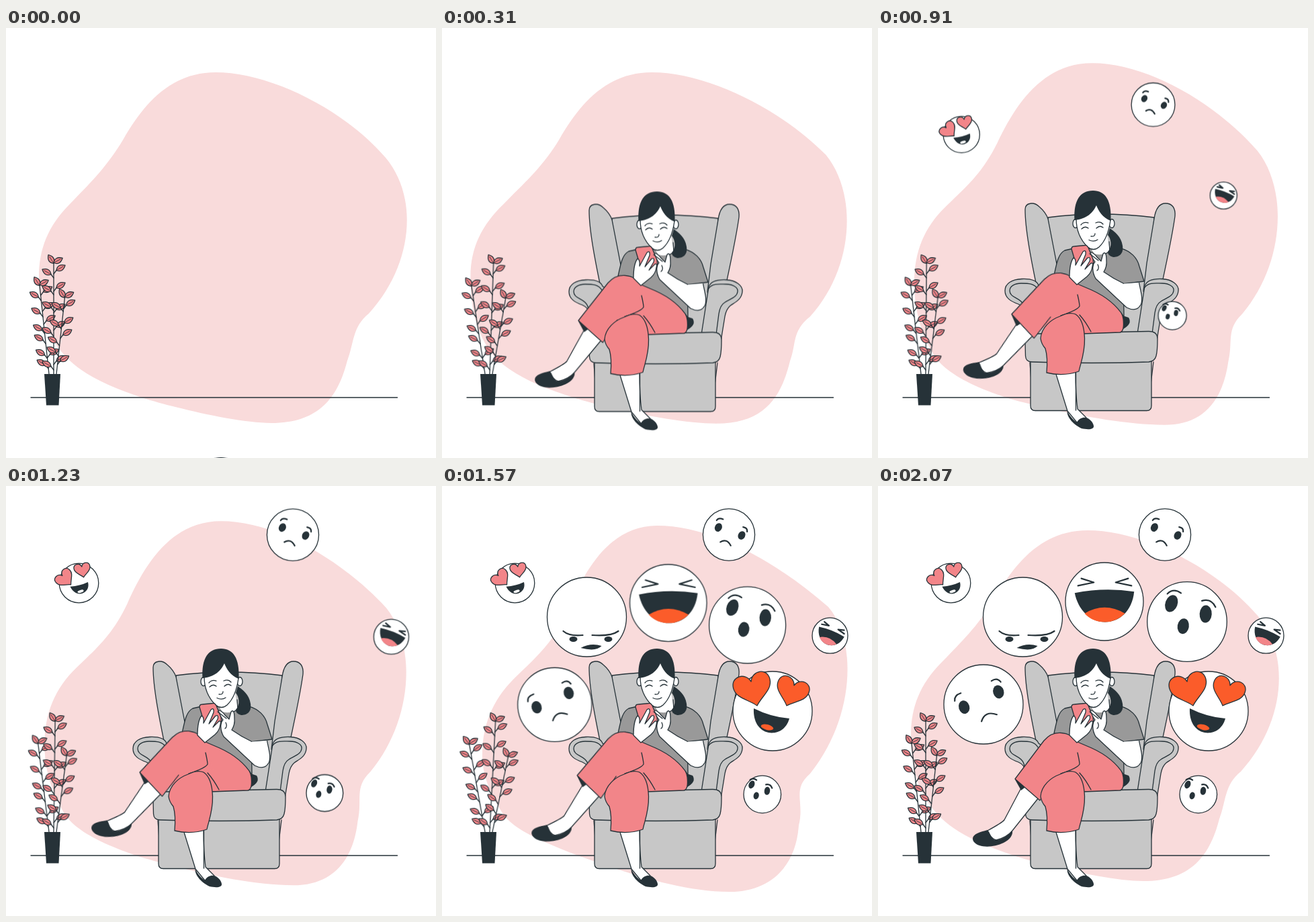
An HTML page for the animation above (2.1 s loop, 640x640 px).

```html
<!DOCTYPE html>
<html lang="en">
<head>
<meta charset="utf-8">
<title>Reactions</title>
<style>
  html, body { margin: 0; width: 100%; height: 100%; overflow: hidden; background: #fff; }
  svg { display: block; width: 100vw; height: 100vh; }
  .line { fill: none; stroke: #263238; stroke-width: 1.3; stroke-linecap: round; stroke-linejoin: round; }
  .white, .pink, .grey, .shirt { stroke: #263238; stroke-width: 1.3; stroke-linejoin: round; }
  .white { fill: #fff; }
  .pink { fill: #f28589; }
  .grey { fill: #c7c7c7; }
  .shirt { fill: #999; }
  .dark { fill: #263238; }
  .bare { stroke: none; }
  .bold { stroke-width: 2.2; }
  .vein { stroke-width: .8; }
  #emojis * { vector-effect: non-scaling-stroke; }
  #emojis > g { transform-origin: 318px 332px; }

  #blob { fill: #f9dbdb; animation: morph 2.1s ease-in-out infinite; }
  @keyframes morph {
    0%, 100% { d: path("M312 66C390 66 500 118 565 193C613 250 608 350 540 425C515 445 518 470 508 495C495 545 470 588 395 588C340 588 240 562 205 551C150 533 110 513 88 488C55 452 49 410 49 370C49 330 62 295 95 262C125 231 150 207 175 165C205 113 245 66 312 66Z"); }
    25% { d: path("M312 66C400 66 510 125 575 187C621 245 617 360 552 432C523 455 533 470 523 497C510 550 487 589 415 589C350 589 236 564 195 551C138 533 98 516 73 489C45 456 39 410 39 370C39 325 58 292 90 262C120 231 150 207 175 165C205 113 245 66 312 66Z"); }
    50% { d: path("M320 50C400 50 500 108 563 182C609 240 603 350 540 425C517 448 528 465 521 497C513 560 480 591 428 591C350 591 250 566 200 553C146 536 106 516 88 491C64 452 56.5 415 56.5 380C56.5 335 70 298 103 266C130 240 155 220 178 172C205 113 245 50 320 50Z"); }
    75% { d: path("M320 59C405 59 500 115 575 180C618 230 615 345 548 428C520 452 540 470 531 505C527 565 490 604 428 604C350 604 260 570 205 551C150 530 110 513 92 490C70 455 60 430 60 400C60 350 80 312 112 282C140 255 168 230 188 185C212 125 250 59 320 59Z"); }
  }

  .stem { animation: sway 1.05s ease-in-out infinite; }
  @keyframes sway { 50% { transform: rotate(var(--lean)); } }

  #leg { transform-origin: 296px 383px; animation: swing 2.1s ease-in-out infinite; }
  @keyframes swing { 50% { transform: rotate(6.3deg); } }

  #sitter { animation: rise 2.1s infinite; }
  @keyframes rise {
    0% { transform: translateY(400px); animation-timing-function: cubic-bezier(.333, 1, .667, 1); }
    17.4%, 100% { transform: none; }
  }
</style>
</head>
<body>
<svg viewBox="0 0 640 640">
  <path id="blob" d="M312 66Z"/>
  <path class="line" d="M37 550H582.500"/>
  <g id="plant"></g>
  <path class="dark" d="M57 515H81L78.500 561.500H60Z"/>

  <g id="sitter">
    <!-- chair -->
    <path class="grey" d="M253 282Q330 272 411 282L400 460H265Z"/>
    <path class="grey" d="M236 384C228 345 219 300 219 270C219 260 232 258 240 266C247 272 251 278 253 284L270 372L262 400Z"/>
    <path class="grey" d="M411 284C413 270 418 261 428 261C438 261 443 268 442 280C438 310 430 345 422 384L395 392L400 350Z"/>
    <path class="line" d="M226 498L228 525M410 497L406 530"/>
    <path class="grey" d="M227 490V562Q227 569.500 234 569.500H400Q407 569.500 407 562V490Z"/>
    <path class="grey" d="M219 460V424Q218 415 209 411C198 407 189 402 189 391C189 380 200 374 214 373.500C226 373 236 375 239 383L262 400V460Z"/>
    <path class="line" d="M238 389C233 380 224 380 213 380C204 380 196 384 196 391C196 400 207 401 213 407Q217 411 218 417"/>
    <path class="grey" d="M386 455L397 384C400 375 412 373 423 373.500C437 374 448 382 447 391C446 403 436 407 429 412Q423 417 421 428L415 465Z"/>
    <path class="line" d="M397 386C403 378 414 380 423 380C433 380 441 385 440 391C439 400 428 402 421 407Q414 411 412 424L408 455"/>
    <path class="grey" d="M219 466Q220 455 240 455L402 451.500Q416 451 416 463Q416 480 414 488Q412 496 403 497Q320 500 229 497Q220 497 219.500 488Z"/>

    <!-- torso -->
    <path class="dark" d="M364 428L373 431Q379 440 365 448Z"/>
    <path class="pink" d="M283 371L340 398Q362 415 365 433Q367 452 360 453Q335 454 305 455L262 440Z"/>
    <path class="shirt" d="M262 368C266 350 268 336 278 331L300 326L345 333L362 328C376 332 386 342 389 355L396 377L363 381C366 396 366 412 366 430C355 412 340 400 318 390L297 381L283 372Z"/>
    <path class="white bare" d="M314 324L341 308L345 331Q336 340 322 336Z"/>
    <path class="line" d="M344 318L345 332L336 338"/>
    <path class="dark" d="M345 298C352 303 362 310 364 324C366 337 358 341 350 341Q342 339 342 333C349 325 347 314 342 308Z"/>

    <!-- head -->
    <ellipse class="white" cx="294" cy="291" rx="4" ry="6.500"/>
    <ellipse class="white" cx="348" cy="291" rx="4" ry="6.500"/>
    <path class="white" d="M295 284C295 305 303 317 312 326Q321 333 329 326Q342 314 346 286L325 258Z"/>
    <path class="dark" d="M292.500 286C291 256 301 242 320 242C338 242 348 256 346.500 287C334 282 328 272 325 264C320 275 311 284 292.500 286Z"/>
    <path class="line" d="M302 293Q306 288 313 290M324 290Q331 287 335 292M303 299Q308 294 313 298M325 298Q330 293 335 297M323 306Q323 311 317 310M314 315.500Q321 319 327 315"/>

    <!-- crossed leg -->
    <g id="leg">
      <path class="white" d="M216 444L188 497Q185 501 163 513Q168 525 176 527Q192 523 200 513L239 464Z"/>
      <path class="dark" d="M141 525C141 518 152 515 163 512C167 516 168 524 174 527C184 527 193 521 200 513C201 519 197 526 187 531C175 537 160 538 151 535C145 533 141 529 141 525Z"/>
      <path class="dark" d="M204 437L213 453L222 446L208 434Z"/>
      <path class="pink bare" d="M204 436L247 379Q258 366 273 367.500Q285 369 297 381L312 420L290 428Q262 432 241 468Z"/>
      <path class="line" d="M262 434L241 468L204 436L247 379Q258 366 273 367.500Q280 368 286 371"/>
    </g>
    <path class="line" d="M297 397Q300 410 300 414Q297 420 272 428M300 427Q309 437 317 452"/>

    <!-- standing leg -->
    <path class="white" d="M264 512L282 570L296 587L310 580L297 567Q294 545 294 510Z"/>
    <path class="line" d="M294.500 512V569"/>
    <path class="dark" d="M281.500 570C281 580 292 591 303 596C312 598 322 598 321 592C320 586 314 581 310 580C305 579 299 581 296 587C291 584 285 577 281.500 570Z"/>
    <path class="pink" d="M242 462C243 446 257 434 271 429Q285 422 294 426C303 432 307 446 307.500 462C308 485 301 500 299 511Q276 519 251 513Q253 490 249 477Q243 470 242 462Z"/>

    <!-- phone and hands -->
    <path class="white" d="M388.500 379C391 392 395 404 391 412C386 421 378 420 370 416L324 373C318 362 319 352 323 348L314 335Q318 331 326 341L332 347L335 336Q340 331 340 346Q341 355 336 363Q350 373 366 380.500"/>
    <path class="pink" d="M288 329Q288 325 292 325L308 323.500Q311 323 313 327L320 344Q322 357 315 360L296 356Z"/>
    <path class="white" d="M296 382L285 371C285 358 287 347 291 342Q295 343 294 353L305 333Q310 329 309 337L302 354L312 342Q317 340 315 347L308 359L317 350Q321 349 319 355Q318 364 311 370Z"/>
    <path class="line" d="M315 336L328 346M327 352Q330 358 326 361"/>
  </g>

  <g id="emojis"></g>
</svg>
<script>
  const LOOP = 2100, PINK = '#f28589', ORANGE = '#fb5c2a';
  const byId = id => document.getElementById(id);
  const line = (d, cls = '') => `<path class="line ${cls}" d="${d}"/>`;
  const fill = (d, color = '#263238') => `<path fill="${color}" d="${d}"/>`;
  const oval = (x, y, rx, ry, tilt = 0, color = '#263238') =>
    `<ellipse rx="${rx}" ry="${ry}" fill="${color}" transform="translate(${x} ${y}) rotate(${tilt})"/>`;

  // Plant: leaf heights on the left and right of each stem
  const leaf = (x, y, turn) =>
    `<g transform="translate(${x} ${y}) rotate(${turn})">
      <path class="pink" d="M-7.500 0Q-1 -8 7.500 0Q-1 8 -7.500 0Z"/>${line('M-7.500 0H4', 'vein')}</g>`;

  function stem(x0, x1, top, lean, left, right) {
    const at = y => x1 + (x0 - x1) * (y - top) / (515 - top);
    const side = (ys, s) => ys.map(y => {
      const x = at(y + 9), cx = x + s * 10.5;
      return line(`M${x} ${y + 9}L${cx - s * 6} ${y + 3}`) + leaf(cx, y, s > 0 ? -30 : 210);
    }).join('');
    return `<g class="stem" style="--lean:${lean}deg;transform-origin:${x0}px 515px">
      ${line(`M${x0} 515L${x1} ${top}`)}${side(left, -1)}${side(right, 1)}
      ${leaf(x1 - 4, top - 6, 238)}${leaf(x1 + 6.5, top - 4, -28)}</g>`;
  }
  byId('plant').innerHTML =
    stem(64, 50, 383, -4.1, [397, 421, 446, 461, 483, 498], [389, 413, 432, 482]) +
    stem(71, 71, 350, 3, [363, 388, 412, 450, 500], [357, 383, 415, 441, 492]) +
    stem(75, 87.5, 401, 5.6, [413, 439, 464, 479], [409, 435, 453, 492]);

  // Faces are drawn around 0,0 in a circle of radius 59
  const heart = (x, y, turn, size, color) =>
    `<path class="line" style="fill:${color}" transform="translate(${x} ${y}) rotate(${turn}) scale(${size})"
      d="M0 0C-10 -12 -28 -18 -28 -34C-28 -52 -5 -53 0 -37C5 -53 28 -52 28 -34C28 -18 10 -12 0 0Z"/>`;

  const faces = {
    sad: () => oval(-28, -8, 8, 10, 8) + oval(28, -8, 8, 10, 8) +
      line('M-37 -22Q-35 -30 -24 -29M37 -20Q35 -29 25 -27M-13 22Q-2 9 12 22', 'bold'),
    laugh: color => line('M-35 -35L-16 -29L-40 -24M36 -35L17 -29L41 -24', 'bold') +
      fill('M-45 -13Q0 -22 45 -15C42 15 22 31 1 31C-22 31 -40 12 -45 -13Z') +
      fill('M-30 18Q0 0 31 18Q18 31 1 31Q-18 31 -30 18Z', color),
    awe: () => oval(-30, -19, 9, 13, 3) + oval(23, -19, 9, 13, -14) + oval(-3.5, 8, 8.5, 11.5, -8) +
      line('M-40 -31Q-34 -42 -21 -38M12 -36Q24 -44 34 -33', 'bold'),
    love: (color, tongue) => heart(-23, -8, -14, 1, color) + heart(21, -8, 20, .87, color) +
      fill('M-28 -4Q-2 9 25 11C20 29 6 34 -6 32C-20 29 -29 16 -28 -4Z') +
      oval(-8, 24, 9.5, 4, 14, tongue),
    angry: () => line('M-35 21Q-26 29 -6 27M47 21Q36 29 8 27', 'bold') +
      oval(-20, 33, 6, 4) + oval(32, 33, 6, 4) + fill('M-9 46Q6 38 22 43Q14 52 -9 46Z')
  };

  function emoji(kind, x, y, r, turn, start, span, colors = [], shift = '0 0') {
    const g = document.createElementNS('http://www.w3.org/2000/svg', 'g');
    g.innerHTML = `<circle class="white" cx="${x}" cy="${y}" r="${r}"/>
      <g transform="translate(${x} ${y}) scale(${r / 59}) rotate(${turn}) translate(${shift})">${faces[kind](...colors)}</g>`;
    byId('emojis').append(g);
    const hidden = { transform: 'scale(0)' }, shown = { transform: 'scale(1)' };
    g.animate([
      { ...hidden, offset: 0 },
      { ...hidden, offset: start / LOOP, easing: 'cubic-bezier(.333, 1, .667, 1)' },
      { ...shown, offset: (start + span) / LOOP },
      { ...shown, offset: 1 }
    ], { duration: LOOP, iterations: Infinity });
  }

  emoji('love', 108.5, 144.5, 29.3, -30, 590, 555, [PINK, '#fff']);
  emoji('sad', 427, 72.5, 38.6, 19, 590, 703);
  emoji('laugh', 577.5, 222.7, 26.5, 23, 590, 855, [PINK]);
  emoji('awe', 476.8, 459, 27.8, 22, 590, 855, [], '-13 3');
  emoji('love', 492, 335, 59, 0, 1250, 290, [ORANGE, ORANGE]);
  emoji('angry', 215.5, 195, 59, 0, 1250, 315);
  emoji('laugh', 337, 172, 58, 0, 1250, 418, [ORANGE]);
  emoji('awe', 460, 202, 59.3, 17, 1250, 484);
  emoji('sad', 157, 325, 59, -24, 1250, 540);
</script>
</body>
</html>
```
